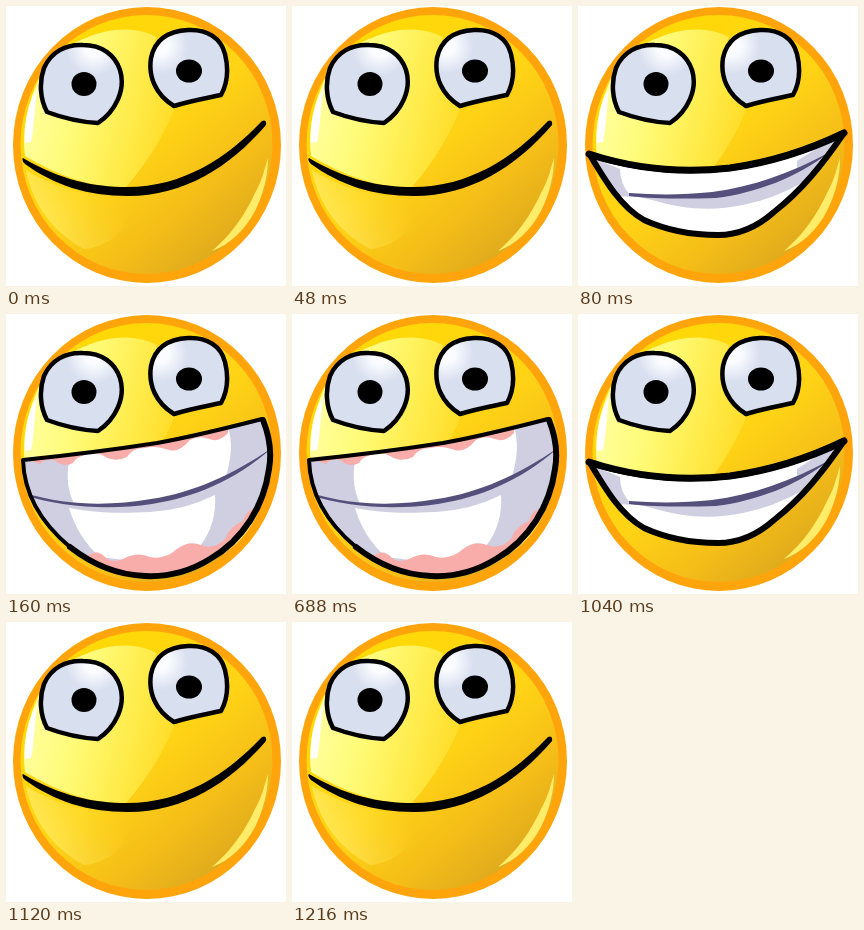
These frames come from a looping animation (280 by 280 pixels, 1.28 s). An HTML page:

```html
<!DOCTYPE html>
<html lang="en">
<head>
<meta charset="utf-8">
<title>Grin</title>
<style>
html, body { margin: 0; width: 100%; height: 100%; overflow: hidden; background: #fff; }
svg { display: block; width: 100vw; height: 100vh; }
.pose { opacity: 0; }
.line { fill: none; stroke: #000; stroke-linecap: round; stroke-linejoin: round; }
.shade { fill: #d0cee1; }
.gum { fill: #f8adab; }
.groove { fill: #54507b; }
</style>
</head>
<body>
<svg viewBox="0 0 280 280">
  <defs>
    <linearGradient id="skin" gradientUnits="userSpaceOnUse" x1="50" y1="70" x2="205" y2="255">
      <stop offset="0" stop-color="#ffd808"/>
      <stop offset=".45" stop-color="#ffd415"/>
      <stop offset=".75" stop-color="#f5be18"/>
      <stop offset="1" stop-color="#dfaa1d"/>
    </linearGradient>
    <linearGradient id="sheen" gradientUnits="userSpaceOnUse" x1="22" y1="90" x2="165" y2="125">
      <stop offset="0" stop-color="#ffffa0"/>
      <stop offset=".35" stop-color="#fffb78"/>
      <stop offset=".7" stop-color="#ffec4c"/>
      <stop offset="1" stop-color="#ffdc28"/>
    </linearGradient>
    <linearGradient id="glow" gradientUnits="userSpaceOnUse" x1="35" y1="225" x2="120" y2="190">
      <stop offset="0" stop-color="#fff07a" stop-opacity=".7"/>
      <stop offset="1" stop-color="#ffdf30" stop-opacity="0"/>
    </linearGradient>
    <radialGradient id="leftEye" gradientUnits="userSpaceOnUse" cx="88" cy="42" r="28">
      <stop offset=".3" stop-color="#fafcff"/>
      <stop offset="1" stop-color="#d8dfef"/>
    </radialGradient>
    <radialGradient id="rightEye" gradientUnits="userSpaceOnUse" cx="154" cy="40" r="28">
      <stop offset=".3" stop-color="#fafcff"/>
      <stop offset="1" stop-color="#d8dfef"/>
    </radialGradient>
    <path id="midMouth" d="M12 149C60 164 108 167 152 162C196 156 235 142 266 127C244 159 224 184 196 206C178 222 160 229 140 229C113 229 90 225 66 214C43 201 28 176 12 149Z"/>
    <path id="wideMouth" d="M17 146C66 141 112 135 151 129C190 122 225 113 256 105C263 121 266 138 263 155C258 192 237 226 204 245C183 258 160 263 139 262C112 261 87 251 64 233C34 208 18 180 17 146Z"/>
    <clipPath id="midClip"><use href="#midMouth"/></clipPath>
    <clipPath id="wideClip"><use href="#wideMouth"/></clipPath>
  </defs>

  <ellipse cx="141" cy="139" rx="134" ry="138" fill="#ffa50b"/>
  <ellipse cx="140.5" cy="138.5" rx="126" ry="129.5" fill="url(#skin)"/>
  <path fill="url(#sheen)" d="M19 150C16 128 20 104 29 82C39 58 57 40 80 32C103 22 128 20 151 31C143 55 150 83 169 102C158 128 143 155 119 182C85 181 52 170 19 150Z"/>
  <path fill="#fff" d="M19 137C18 116 22 97 32 81C28 99 29 119 25 136Z"/>
  <path fill="#ffec68" d="M262 152C258 165 256 175 249 187C239 209 225 229 206 245C223 239 239 224 249 205C258 187 262 169 262 152Z"/>

  <g class="pose" data-pose="closed">
    <path fill="url(#glow)" d="M20 164C59 188 97 192 130 190C126 218 107 241 78 243C48 227 27 200 20 164Z"/>
    <path d="M17 152C54 174 88 181 121 181C177 181 221 152 256 115Q261 113 260 119C224 161 178 190 122 190C81 190 48 179 19 158Q15 154 17 152Z"/>
  </g>

  <g class="pose" data-pose="mid">
    <g clip-path="url(#midClip)">
      <path fill="#fff" d="M0 100H280V270H0Z"/>
      <path class="shade" d="M10 150L42 163Q42 178 52 189L74 194C106 204 136 205 165 199Q195 193 224 177L280 120L258 130L219 155V167Q190 181 138 189L66 191L30 190Z"/>
      <path class="groove" d="M51 187C78 189 106 189 134 186C174 181 213 167 252 146C218 172 178 187 138 192C108 193 76 193 51 190Z"/>
    </g>
    <use href="#midMouth" class="line" stroke-width="6"/>
    <path class="line" stroke-width="7" d="M11 148C60 164 108 167 152 162C196 156 235 142 266 127"/>
  </g>

  <g class="pose" data-pose="wide">
    <g clip-path="url(#wideClip)">
      <path class="shade" d="M0 90H280V280H0Z"/>
      <path fill="#fff" d="M65 140L222 112Q229 136 219 165C170 192 116 194 68 190Q57 166 65 140Z"/>
      <path fill="#fff" d="M63 194C85 198 106 200 144 198Q179 196 209 181Q211 210 194 232L151 250L94 243Q72 224 63 194Z"/>
      <path class="gum" d="M16 144L125 128L223 108L222 119Q213 129 203 125Q193 121 184 126Q173 139 163 136Q149 131 139 134Q126 134 121 143Q109 149 98 142Q87 136 79 141Q70 143 67 149Q57 154 48 146Q38 144 34 150Z"/>
      <path class="gum" d="M80 243Q91 234 99 243Q106 250 117 245Q131 237 144 243Q159 246 171 235Q183 226 195 231Q208 236 219 225Q224 212 237 207Q239 196 254 192L252 230L204 260L139 275L90 258Z"/>
      <path class="groove" d="M18 179C63 192 104 192 145 185C189 178 228 160 267 133C229 167 189 183 146 190C104 196 58 194 18 181Z"/>
    </g>
    <use href="#wideMouth" class="line" stroke-width="4"/>
    <path class="line" stroke-width="6" d="M257 106C263 121 266 138 263 155C258 192 237 226 204 245C183 258 160 263 139 262C112 261 87 251 64 233"/>
  </g>

  <g class="line" stroke-width="4.5">
    <path fill="url(#leftEye)" d="M41 106C34 93 33 76 38 62C45 46 60 38 77 39C96 39 109 49 114 64C120 83 110 105 92 117C74 116 57 112 41 106Z"/>
    <path fill="url(#rightEye)" d="M168 100C150 89 142 71 145 52C149 33 163 25 182 24C201 23 215 32 219 48C223 64 221 78 215 89C201 92 184 95 168 100Z"/>
  </g>
  <ellipse cx="78" cy="78" rx="12.5" ry="12"/>
  <ellipse cx="183" cy="65" rx="13" ry="11.5"/>
</svg>
<script>
const LOOP = 1280;
const steps = [[0, "closed"], [80, "mid"], [160, "wide"], [1040, "mid"], [1120, "closed"], [LOOP, "closed"]];

for (const part of document.querySelectorAll(".pose")) {
  const frames = steps.map(([time, pose]) => ({
    offset: time / LOOP,
    opacity: pose === part.dataset.pose ? 1 : 0,
    easing: "step-end"
  }));
  part.animate(frames, { duration: LOOP, iterations: Infinity });
}
</script>
</body>
</html>
```
